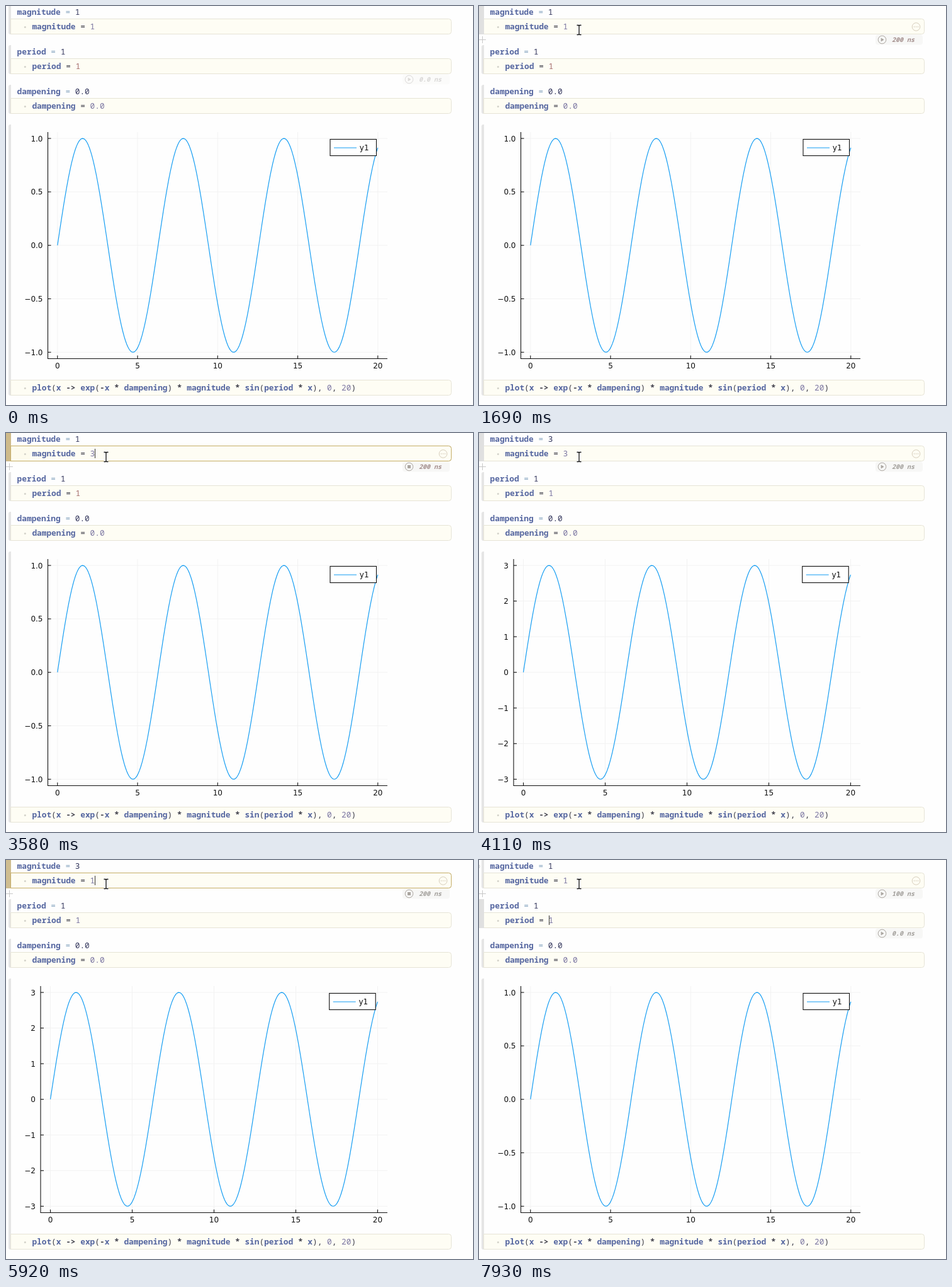
An HTML page for the animation above (8000 ms loop, 742x633 px).

```html
<!DOCTYPE html>
<html lang="en">
<head>
<meta charset="utf-8">
<title>Damped sine notebook</title>
<style>
html, body { margin: 0; width: 100%; height: 100%; overflow: hidden; background: #fefefe; }
svg { display: block; width: 742px; height: 633px; }
text { white-space: pre; }
.code { font: 12.8px "Noto Sans Mono", "DejaVu Sans Mono", monospace; fill: #3d3d48; }
.code .v { font-weight: 700; fill: #5566a0; }
.code .o { font-weight: 600; }
.code .n { fill: #7b76a2; }
.code .eq { fill: #86a6c0; }
.code.res { fill: #33365c; }
.tick { font: 12px "DejaVu Sans", sans-serif; fill: #111; }
.time { font: italic 600 10px "Noto Sans Mono", "DejaVu Sans Mono", monospace; fill: #a3a09c; }
.bar { fill: #e5e5e5; }
.box { fill: #fefdf4; stroke: #e6e4d6; }
.pill { fill: #f7f7f6; }
.icon { fill: none; stroke: #aaa59f; }
.solid { fill: #aaa59f; }
.more { fill: none; stroke: #d6cdbb; }
.caret { fill: #333; }

/* one loop is 8 s, so 1% is 80 ms */
.anim, .anim2 { animation: 8s step-end infinite; }
.soft { animation: 8s linear infinite; }

#caret1 { animation-name: caret1; }
@keyframes caret1 {
  0% { opacity: 0; transform: none; }
  15.25% { opacity: 1; }
  21.125% { opacity: 0; }
  28% { opacity: 1; transform: none; }
  35% { opacity: 1; transform: translateX(-7px); }
  36% { opacity: 1; transform: none; }
  51.375% { opacity: 0; transform: none; }
  58.5% { opacity: 1; transform: none; }
  64.25% { opacity: 1; transform: translateX(-7px); }
  65.125% { opacity: 1; transform: none; }
  80.625%, 100% { opacity: 0; transform: none; }
}
#caret2 { animation-name: caret2; }
@keyframes caret2 {
  0% { opacity: 0; transform: none; }
  81.625% { opacity: 1; transform: none; }
  88.25% { opacity: 1; transform: translateX(8px); }
  90.375% { opacity: 1; transform: translateX(15px); }
  97.25% { opacity: 0; transform: translateX(15px); }
  98.125% { opacity: 1; transform: translateX(61px); }
  99.125%, 100% { opacity: 1; transform: translateX(69px); }
}
.outA { animation-name: outA; }
.outB { animation-name: outB; }
@keyframes outA { 0% { opacity: 1; } 45.625% { opacity: 0; } 74.875%, 100% { opacity: 1; } }
@keyframes outB { 0% { opacity: 0; } 45.625% { opacity: 1; } 74.875%, 100% { opacity: 0; } }
.inA { animation-name: inA; }
.inB { animation-name: inB; }
@keyframes inA { 0% { opacity: 1; } 35% { opacity: 0; } 65.125%, 100% { opacity: 1; } }
@keyframes inB { 0% { opacity: 0; } 36% { opacity: 1; } 64.25%, 100% { opacity: 0; } }
.first { animation-name: first; }
.second { animation-name: second; }
@keyframes first { 0% { opacity: 1; } 74.875%, 100% { opacity: 0; } }
@keyframes second { 0% { opacity: 0; } 74.875%, 100% { opacity: 1; } }
.sel1 { animation-name: sel1; }
.sel2 { animation-name: sel2; }
@keyframes sel1 { 0% { opacity: 0; } 15.25% { opacity: 1; } 81.625%, 100% { opacity: 0; } }
@keyframes sel2 { 0% { opacity: 0; } 81.625%, 100% { opacity: 1; } }
#sliver { animation-name: sliver; }
@keyframes sliver { 0% { opacity: 0; } 8.5% { opacity: 1; } 15.25% { opacity: 0; } 81.625%, 100% { opacity: 1; } }
#play1 { animation-name: play; }
@keyframes play { 0% { opacity: 1; } 43.75% { opacity: 0; } 45.625% { opacity: 1; } 72.75% { opacity: 0; } 74.875%, 100% { opacity: 1; } }
#stop1 { animation-name: stop; }
@keyframes stop { 0% { opacity: 0; } 43.75% { opacity: 1; } 45.625% { opacity: 0; } 72.75% { opacity: 1; } 74.875%, 100% { opacity: 0; } }
#dark1 { animation-name: dark; }
@keyframes dark { 0% { opacity: 0; } 36% { opacity: 1; } 43.75% { opacity: 0; } 65.125% { opacity: 1; } 72.75%, 100% { opacity: 0; } }
#period .n { animation: warmNum 8s step-end infinite; }
@keyframes warmNum { 0% { fill: #a8706f; } 45.625%, 100% { fill: #7b76a2; } }
#run1 .time { fill: #a3a09c; }
#run1 .warm { animation: warmTime 8s step-end infinite; }
@keyframes warmTime { 0% { fill: #a48f8d; } 45.625%, 100% { fill: #a3a09c; } }

#goldBar { animation-name: goldBar; }
@keyframes goldBar {
  0%, 35% { opacity: 0; } 37%, 43.75% { opacity: 1; } 46.625%, 64.25% { opacity: 0; }
  66.125%, 72.75% { opacity: 1; } 75.875%, 100% { opacity: 0; }
}
#gutter { animation-name: gutter; }
@keyframes gutter {
  0%, 35% { opacity: 0; } 36.9%, 43.75% { opacity: 1; } 45%, 64.25% { opacity: 0; }
  66.125%, 72.75% { opacity: 1; } 74%, 100% { opacity: 0; }
}
#goldEdge { animation-name: goldEdge; }
@keyframes goldEdge {
  0%, 35% { opacity: 0; } 37% { opacity: .7; } 37.875%, 45% { opacity: 1; } 46.625%, 64.25% { opacity: 0; }
  66.125%, 74% { opacity: 1; } 75.875%, 100% { opacity: 0; }
}
#run1 { animation-name: run1; }
@keyframes run1 { 0%, 7.8% { opacity: 0; } 9.375%, 100% { opacity: 1; } }
#more1 { animation-name: more1; }
@keyframes more1 { 0%, 7.8% { opacity: 0; } 9.375% { opacity: .6; } 11.25%, 100% { opacity: 1; } }
#run2 { animation-name: run2; }
@keyframes run2 {
  0%, .875% { opacity: .4; } 2.5%, 7% { opacity: 0; } 8.4% { opacity: .7; } 9.375% { opacity: .42; }
  11.25%, 81.625% { opacity: 0; } 84.5%, 100% { opacity: 1; }
}
#more2 { animation-name: more2; }
@keyframes more2 { 0%, 7% { opacity: 0; } 8.2% { opacity: .4; } 9.375% { opacity: .1; } 10.4%, 100% { opacity: 0; } }
#run3, #more3 { animation-name: pass3; }
@keyframes pass3 { 0%, 6.2% { opacity: 0; } 7.6% { opacity: .6; } 9.375% { opacity: .2; } 10.4%, 100% { opacity: 0; } }

#mouse { animation: mouse 8s step-end infinite; }
@keyframes mouse {
  0% { transform: translate(250px, 660px); }
  .875% { transform: translate(250px, 620px); animation-timing-function: steps(9, end); }
  9.375% { transform: translate(86px, 24px); }
  10.375% { transform: translate(96px, 26px); animation-timing-function: steps(5, end); }
  15.25% { transform: translate(159px, 37px); }
  17.375%, 100% { transform: translate(159px, 38px); }
}
</style>
</head>
<body>
<svg id="stage" viewBox="0 0 742 633"></svg>
<script>
const ADV = 7.68, IN_X = 41.4, OUT_X = 17.6;

const text = (x, y, body, cls = "code", extra = "") =>
  `<text x="${x}" y="${y}" class="${cls}" ${extra}>${body}</text>`;
const line = (x1, y1, x2, y2, style) => `<path d="M${x1} ${y1}L${x2} ${y2}" ${style}/>`;
const span = (cls, s) => `<tspan class="${cls}">${s}</tspan>`;

const bar = (y, h) => `<path class="bar" d="M8 ${y}v${h}h-1q-3 0-3-3v${6 - h}q0-3 3-3z"/>`;
const wideBar = (y, cls) => `<path class="anim ${cls}" fill="#e0e0e0" d="M0 ${y}h8v46h-8z"/>`;
const boxPath = y => `M7.5 ${y}h696q4 0 4 4v16q0 4-4 4h-696z`;
const inputBox = y => `<path class="box" d="${boxPath(y)}"/>`;
const bullet = y => `<circle cx="30.3" cy="${y + .5}" r="1.5" fill="#d3d2c9"/>`;

function triangle(y, color) {
  return `<circle cx="640.5" cy="${y}" r="6.3" fill="none" stroke="${color}"/>` +
    `<path d="M638.7 ${y - 3}l4.8 3l-4.8 3z" fill="${color}"/>`;
}

function runTime(n, y, body) {
  return `<g id="run${n}" class="soft"><rect class="pill" x="630" y="${y - 8}" width="75" height="16" rx="4"/>${body}</g>`;
}

function hover(n, y) {
  const dots = [-3, 0, 3].map(d => `<circle cx="${694.5 + d}" cy="${y + 34}" r=".5"/>`).join("");
  return `<g id="more${n}" class="soft"><g class="more"><circle cx="694.5" cy="${y + 34}" r="6.3"/>${dots}</g>` +
    `<path d="M0 ${y + 54.5}h11M5.5 ${y + 49}v11" stroke="#c8c8c8" fill="none"/></g>`;
}

// Output line above, code line below
function cell(id, y, value) {
  const out = span("v", id) + span("eq", " = "), inp = span("v", id) + " = ";
  const end = (id.length + 3) * ADV;
  let s = `<g id="${id}">` + bar(y, 46) + inputBox(y + 21.5);
  if (id === "magnitude") {
    s += wideBar(y, "sel1") +
      `<rect id="goldBar" class="soft" y="${y}" width="8" height="46" fill="#c4a65c"/>` +
      `<rect id="gutter" class="soft" x="8" y="21" width="30" height="23" fill="#f6edcf"/>` +
      `<path id="goldEdge" class="soft" d="${boxPath(20.5)}" fill="none" stroke="#c5ad66"/>`;
  }
  if (id === "period") s += wideBar(y, "sel2");
  s += bullet(y + 34) + text(OUT_X, y + 15, out, "code res") + text(IN_X, y + 38.2, inp);
  const values = value ? [[value, "", ""]] : [["1", "outA", "inA"], ["3", "outB", "inB"]];
  for (const [v, o, i] of values) {
    s += text(OUT_X + end, y + 15, v, `code res anim ${o}`) +
      `<g class="anim ${i}">${text(IN_X + end, y + 38.2, span("n", v))}</g>`;
  }
  return s + "</g>";
}

function plot(cls, amp, axis, x0, x20, ticks, legend) {
  const top = 200, base = 559.5, mid = 379.7, unit = 169.6 / amp;
  const px = x => x0 + (x20 - x0) * x / 20, py = v => mid - unit * v;
  const ink = 'stroke="#111" stroke-width="1.1"', faint = 'stroke="#f2f2f2"';
  let grid = "", marks = "";
  for (let x = 0; x <= 20; x += 5) {
    grid += line(px(x), top, px(x), base, faint);
    marks += line(px(x), base, px(x), base - 5, ink) + text(px(x), 575, x, "tick", 'text-anchor="middle"');
  }
  for (const label of ticks) {
    const y = py(+label);
    grid += line(axis, y, 606, y, faint);
    marks += line(axis, y, axis + 5, y, ink) +
      text(axis - 8, y + 4.4, label.replace("-", "\u2212"), "tick", 'text-anchor="end"');
  }
  const pts = [];
  for (let i = 0; i <= 250; i++) {
    const x = i * .08;
    pts.push(px(x).toFixed(2) + " " + py(amp * Math.sin(x)).toFixed(2));
  }
  const blue = 'fill="none" stroke="#109bf2" stroke-width="1.15"';
  return `<g class="anim ${cls}">${grid}` +
    line(axis, top, axis, base + .5, ink) + line(axis, base, 606, base, ink) + marks +
    `<path d="M${pts.join("L")}" ${blue} stroke-linejoin="round"/>` +
    `<rect x="${legend}" y="211.5" width="73.5" height="26" fill="#fff" ${ink}/>` +
    line(legend + 6, 225, legend + 42, 225, blue) +
    text(legend + 46.8, 229.3, "y1", "tick") + "</g>";
}

const highlight = src => src.replace(/->|[a-z]+|\d+|[*-]/g, m =>
  span(/[a-z]/.test(m) ? "v" : /\d/.test(m) ? "n" : "o", m.replace(">", "&gt;")));

const run1 =
  `<g id="play1" class="anim">${triangle(53.5, "#aaa59f")}</g>` +
  `<g id="dark1" class="anim">${triangle(53.5, "#77715f")}</g>` +
  `<g id="stop1" class="anim"><circle class="icon" cx="640.5" cy="53.5" r="6.3"/>` +
  `<rect class="solid" x="638" y="51" width="5" height="5"/></g>` +
  `<g class="anim first">${text(656, 57, "200 ns", "time warm")}</g>` +
  `<g class="anim second">${text(656, 57, "100 ns", "time")}</g>`;
const run = (y, label) => triangle(y, "#aaa59f") + text(656, y + 3.5, label, "time");

const beam = "M-3.5 -7.5h2.5l1 1l1 -1h2.5M0 -6.5v13M-3.5 7.5h2.5l1 -1l1 1h2.5";

document.getElementById("stage").innerHTML =
  cell("magnitude", -1) + cell("period", 62, "1") + cell("dampening", 125, "0.0") +
  bar(188, 430) + inputBox(593.5) + bullet(606) +
  text(IN_X, 610.2, highlight("plot(x -> exp(-x * dampening) * magnitude * sin(period * x), 0, 20)")) +
  plot("outA", 1, 66.5, 81.8, 590.8, ["1.0", "0.5", "0.0", "-0.5", "-1.0"], 515) +
  plot("outB", 3, 55, 70.5, 590.5, ["3", "2", "1", "0", "-1", "-2", "-3"], 513.7) +
  runTime(1, 53.5, run1) + runTime(2, 116.5, run(116.5, "0.0 ns")) + runTime(3, 179.5, run(179.5, "200 ns")) +
  hover(1, -1) + hover(2, 62) + hover(3, 125) +
  `<path id="sliver" class="anim" d="M0 7.5q2.5 3 0 5.5" fill="none" stroke="#ccc"/>` +
  `<rect id="caret1" class="anim caret" x="141" y="25" width="1" height="15"/>` +
  `<rect id="caret2" class="anim caret" x="42" y="88" width="1" height="15"/>` +
  `<g id="mouse" fill="none"><path d="${beam}" stroke="#fff" stroke-width="3"/>` +
  `<path d="${beam}" stroke="#111" stroke-width="1.3"/></g>`;
</script>
</body>
</html>
```
